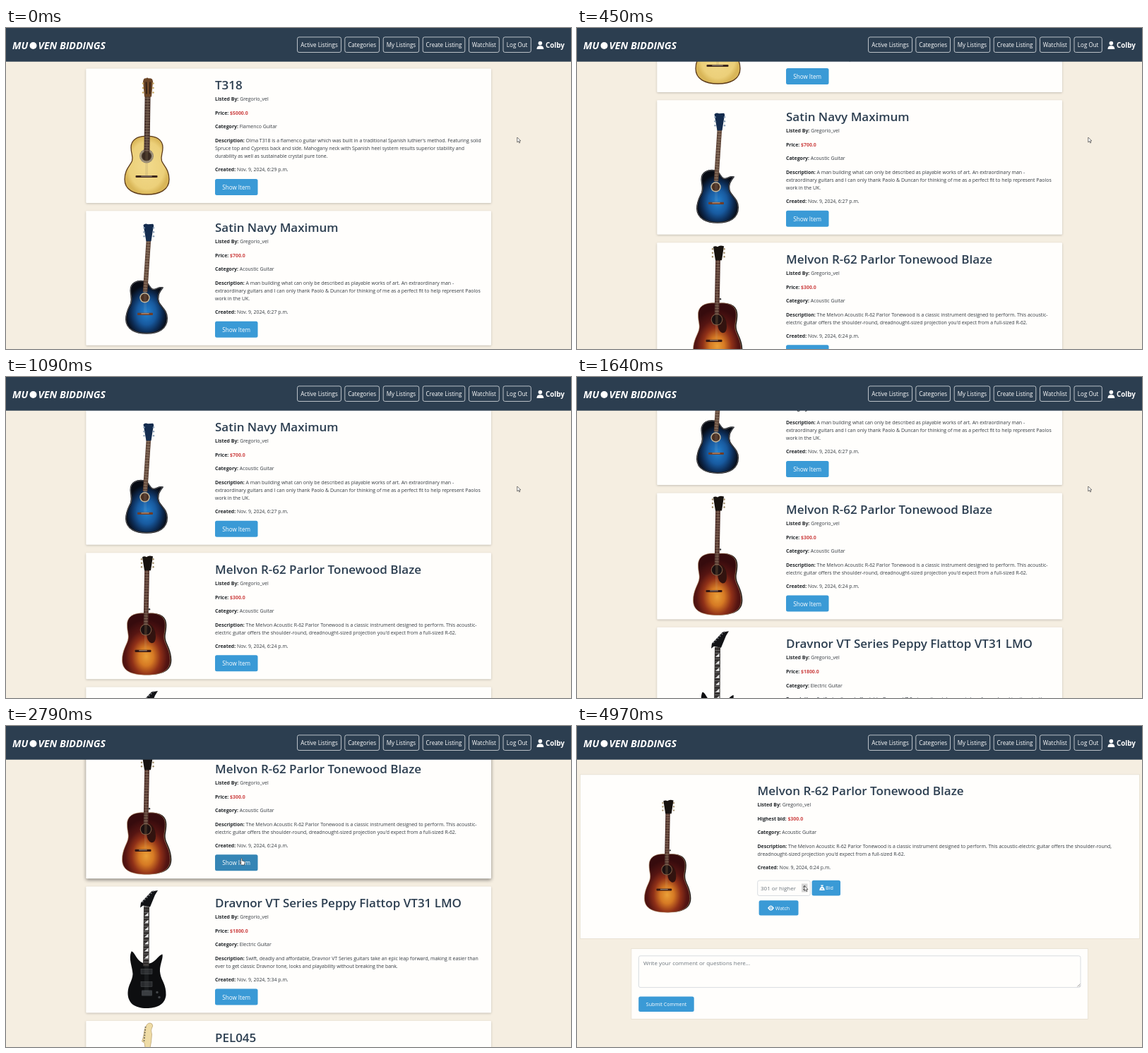
These frames come from a looping animation (800 by 455 pixels, 5000 ms). An HTML page:

```html
<!DOCTYPE html>
<html lang="en">
<head>
<meta charset="utf-8">
<title>Instrument listings</title>
<style>
html, body { margin: 0; width: 100%; height: 100%; overflow: hidden; background: #f5eee1; }
svg { display: block; width: 800px; height: 455px; font-family: 'Open Sans', 'Noto Sans', sans-serif; }
.h { font-size: 17px; font-weight: 600; fill: #2c3e50; }
.p { font-size: 6.93px; fill: #343a40; }
.b { font-weight: 700; fill: #212529; }
.cost { font-weight: 700; fill: #cc4141; }
.nav { font-size: 8.05px; fill: #fff; text-anchor: middle; }
.btn { fill: #fff; text-anchor: middle; }
.user { font-size: 9.8px; font-weight: 700; fill: #fff; }
.brand { font-size: 14.2px; font-weight: 700; font-style: italic; fill: #fff; }
.hint { font-size: 8px; fill: #6c757d; }
.card { fill: #fffefc; filter: drop-shadow(0 1px 1.5px rgba(0,0,0,.2)); }
.panel { fill: #fffefc; stroke: #e6dfd1; stroke-width: .8; }
.field { fill: #fffefc; stroke: #ced4da; stroke-width: .8; }
.blue { fill: #3a9ad6; }
</style>
</head>
<body>
<svg id="stage" viewBox="0 0 800 455" xmlns="http://www.w3.org/2000/svg"></svg>
<script>
const LOOP = 5000, SWITCH = 3000;
const clamp = v => Math.max(0, Math.min(1, v));
const text = (x, y, s, cls, size) =>
  `<text x="${x}" y="${y}" class="${cls}"${size ? ` style="font-size:${size}px"` : ''}>${s}</text>`;
const rect = (x, y, w, h, extra = '', r = 0) =>
  `<rect x="${x}" y="${y}" width="${w}" height="${h}" rx="${r}" ${extra}/>`;
const path = (d, extra) => `<path d="${d}" ${extra}/>`;
const circle = (x, y, r, extra) => `<circle cx="${x}" cy="${y}" r="${r}" ${extra}/>`;
const line = (x1, y1, x2, y2, color, w, dash = '') =>
  path(`M${x1} ${y1}L${x2} ${y2}`, `stroke="${color}" stroke-width="${w}" stroke-dasharray="${dash}" fill="none"`);
const field = (label, value, cls = '') =>
  `<tspan class="b">${label}:</tspan> <tspan class="${cls}">${value}</tspan>`;

// Closed symmetric outline from the cubic points of its right half.
function mirror(cx, half) {
  const right = half.map(([x, y]) => `${cx + x} ${y}`);
  const left = half.slice(0, -1).reverse().map(([x, y]) => `${cx - x} ${y}`);
  return `M${right[0]}C${right.slice(1).join(' ')} ${left.join(' ')}Z`;
}

function neck(x1, y1, x2, y2, w, wood, fret) {
  return line(x1, y1, x2, y2, wood, w) + line(x1, y1, x2, y2, fret, w - 1, '.5 3.4') +
    [-1.2, 0, 1.2].map(o => line(x1 + o, y1, x2 + o, y2, '#b9a68a', .22)).join('');
}

function pegs(xl, xr, y, gap, color, n = 3) {
  let s = '';
  for (let i = 0; i < n; i++)
    s += circle(xl, y + i * gap, 1.2, `fill="${color}"`) + circle(xr, y + i * gap, 1.2, `fill="${color}"`);
  return s;
}

const bridge = (x, y, w, color) =>
  rect(x - w / 2, y - 1.6, w, 3.2, `fill="${color}"`, 1) + line(x - w / 4, y - .4, x + w / 4, y - .4, '#e8dcc0', .7);

function classical() {
  const body = mirror(199.5, [[0, 96], [13, 95], [22.5, 101], [22.5, 112], [22.5, 121], [19, 124], [21, 131],
    [24, 138], [31.5, 143], [31.5, 157], [31.5, 172], [18, 178.5], [0, 178.5]]);
  return path(body, 'fill="url(#spruce)" stroke="#5b3a1a" stroke-width="1.3"') +
    circle(199, 124, 10, 'fill="#8d806a"') + circle(199, 124, 8.6, 'fill="none" stroke="#e8dfc5" stroke-width=".7" stroke-dasharray="1 1"') +
    circle(199, 124, 6.8, 'fill="#3b2b22"') +
    neck(200.6, 38, 199.4, 118, 8, '#47312a', '#a38f78') +
    path('M195 15q2-2 3-1q2-2 4 0q2-1 5 1l1 3-2 22h-10l-2-22z', 'fill="#6b4526"') +
    line(198.5, 19, 199, 36, '#2a1b12', 1.6) + line(204, 19, 203.6, 36, '#2a1b12', 1.6) +
    pegs(194, 208.5, 21, 6.5, '#c5a55e') +
    [-1.2, 0, 1.2].map(o => line(199.2 + o, 118, 199 + o, 152, '#9b8660', .25)).join('') +
    bridge(199, 153, 31, '#3d271d');
}

function cutaway() {
  const body = 'M196 100C186 98 176 102 176.5 113C177 121 179 124 177 131C174 138 170 143 170 154' +
    'C170.5 168 184 173.5 199 173.5C216 173.5 228 167 228 152C228 141 220 137 216.5 130C213.5 122 216 116 221.5 109' +
    'C216 107 212 113 207 111C203 109 202 102 196 100Z';
  return path(body, 'fill="url(#ocean)" stroke="#0a0d16" stroke-width="2"') +
    path(body, 'fill="none" stroke="#d8d4c8" stroke-width=".4"') +
    circle(196.5, 123, 7.2, 'fill="#c5b79a"') + circle(196.5, 123, 5.8, 'fill="#4b3021"') +
    neck(202, 40, 197, 115, 6.5, '#5a4034', '#b49d84') +
    path('M194.5 20Q197 17 201 19L208 18.5Q210 20 208.5 24L205.5 43H198.5Z', 'fill="#142c4e"') +
    pegs(195.5, 209, 24, 6, '#8ba0b5') +
    [-1, 1].map(o => line(197 + o, 115, 197 + o, 145, '#aeb5bd', .25)).join('') +
    bridge(197, 146, 22, '#6f3d28');
}

function sunburst() {
  const half = [[0, 86], [14, 84], [27, 88], [27, 102], [27, 113], [24, 116], [26, 124],
    [28, 131], [34, 139], [34, 152], [34, 168], [20, 173], [0, 173]];
  return path(mirror(200.3, half), 'fill="#17100f"') +
    path(mirror(198.5, half), 'fill="url(#burst)" stroke="#c09a72" stroke-width=".6"') +
    path('M204 101Q212 106 212 119Q212 128 206 128Q200 126 199 116Z', 'fill="#32130f"') +
    circle(198, 109, 8.3, 'fill="#7d5a44"') + circle(198, 109, 7.2, 'fill="#1c1111"') +
    neck(199.6, 23, 198, 102, 6.8, '#4b2d27', '#a78973') +
    path('M193 6Q196 4 199 6Q202 3 208 5L205 25H196Z', 'fill="#17120f"') +
    pegs(192, 208.5, 9, 5.5, '#9f8b67') +
    [-1.2, 0, 1.2].map(o => line(198 + o, 102, 197.5 + o, 138, '#c99b66', .25)).join('') +
    bridge(194, 139, 23, '#361612') + circle(203, 80, 1.2, 'fill="#333"');
}

function electric() {
  const fins = [0, 1, 2, 3, 4, 5, 6].map(i => {
    const y = 37 + i * 10;
    return path(`M196 ${y + 5}L201.5 ${y}V${y + 5}Z`, 'fill="#e9e9e9"');
  }).join('');
  return path('M177.5 92C181 91 184 102 191 107L195 109L203 109C211 108 215 98 221.5 96C223 103 216 113 218.5 124' +
    'C220 133 227 139 226.5 154C225 168 213 172.5 199 172.5C182 172.5 172 165 172.5 150C173 139 179 134 179.5 124' +
    'C179 113 173 103 177.5 92Z', 'fill="#0d0e10"') +
    path('M194 27L190 30L191 23L206 7L215 5.5L211 12L204 29Z', 'fill="#121316"') +
    [0, 1, 2, 3, 4, 5].map(i => circle(193.5 + i * 3, 21.5 - i * 3, 1, 'fill="#85888d"')).join('') +
    path('M195 28H203L202.5 113H194Z', 'fill="#33302f"') +
    line(199, 29, 198.5, 112, '#aaa', 7, '.4 3.5') + fins +
    rect(191, 117, 16, 7, 'fill="#282a2d" stroke="#5d6064" stroke-width=".4"') +
    rect(191, 135, 16, 7, 'fill="#282a2d" stroke="#5d6064" stroke-width=".4"') +
    rect(192, 147, 15, 8, 'fill="#3b3e42"', 1) + circle(214, 150, 1.7, 'fill="#44474a"') + circle(217, 157, 1.7, 'fill="#44474a"') +
    [-2, 0, 2].map(o => line(199 + o, 112, 199 + o, 149, '#77797c', .25)).join('');
}

function mapleHead() {
  return path('M199 6Q202 1.5 206.5 4Q209 7 206.5 10Q204.500 13 206.5 19L205.5 30L204 38H197L196 31L192.500 29Q194 25 195 20Q195.500 11 199 6Z',
    'fill="#efdca6" stroke="#a98d58" stroke-width=".6"') +
    [0, 1, 2, 3, 4, 5].map(i => circle(197.5 - i * .4, 9 + i * 3.8, 1.1, 'fill="#77705c"')).join('') +
    neck(200.5, 37, 200.5, 90, 7, '#e3c27c', '#8d7750');
}

const seller = 'Gregorio_vel';
const burstName = 'Melvon R-62 Parlor Tonewood Blaze';
const burstLead = 'The Melvon Acoustic R-62 Parlor Tonewood is a classic instrument designed to perform. This acoustic-';
const items = [
  { top: 57.5, h: 190.5, art: classical, name: 'T318', cost: '$5000.0', kind: 'Flamenco Guitar', time: '6:29', about: [
    'Olma T318 is a flamenco guitar which was built in a traditional Spanish luthier\'s method. Featuring solid',
    'Spruce top and Cypress back and side. Mahogany neck with Spanish heel system results superior stability and',
    'durability as well as sustainable crystal pure tone.'] },
  { top: 259.3, h: 190.5, art: cutaway, name: 'Satin Navy Maximum', cost: '$700.0', kind: 'Acoustic Guitar', time: '6:27', about: [
    'A man building what can only be described as playable works of art. An extraordinary man -',
    'extraordinary guitars and I can only thank Paolo &amp; Duncan for thinking of me as a perfect fit to help represent Paolos',
    'work in the UK.'] },
  { top: 461.3, h: 179, art: sunburst, name: burstName, cost: '$300.0', kind: 'Acoustic Guitar', time: '6:24', about: [
    burstLead, 'electric guitar offers the shoulder-round, dreadnought-sized projection you\'d expect from a full-sized R-62.'] },
  { top: 651.5, h: 179, art: electric, name: 'Dravnor VT Series Peppy Flattop VT31 LMO', cost: '$1800.0', kind: 'Electric Guitar', time: '5:34', about: [
    'Swift, deadly and affordable, Dravnor VT Series guitars take an epic leap forward, making it easier than',
    'ever to get classic Dravnor tone, looks and playability without breaking the bank.'] },
  { top: 842, h: 179, art: mapleHead, name: 'PEL045' }
];

function details(x, y, item, costLabel) {
  const about = y + 75.2, created = about + item.about.length * 11 + 8.3;
  return text(x, y + 16.5, field('Listed By', seller), 'p') +
    text(x, y + 36, field(costLabel, item.cost, 'cost'), 'p') +
    text(x, y + 55.6, field('Category', item.kind), 'p') +
    item.about.map((s, i) => text(x, about + i * 11, i ? s : field('Description', s), 'p')).join('') +
    text(x, created, field('Created', `Nov. 9, 2024, ${item.time} p.m.`), 'p');
}

function listing(item, i) {
  let s = rect(113.3, 0, 573.7, item.h, `class="card" id="card${i}"`, 1) + item.art() + text(296, 29.5, item.name, 'h');
  if (item.about) {
    const y = item.h - 34;
    s += details(296, 29.3, item, 'Price') +
      rect(296, y, 60.5, 23, `class="blue" id="show${i}"`, 2.5) + text(326.2, y + 15.2, 'Show Item', 'btn', 8.1);
  }
  return `<g transform="translate(0 ${item.top})">${s}</g>`;
}

function detailPage() {
  const item = { ...items[2], about: [burstLead + 'electric guitar offers the shoulder-round,',
    'dreadnought-sized projection you\'d expect from a full-sized R-62.'] };
  return rect(4.4, 68.8, 792.2, 232.7, 'class="panel"') +
    `<g transform="translate(-60 100.7) scale(.945)">${sunburst()}</g>` +
    text(255.5, 98, item.name, 'h') + details(255.5, 97.8, item, 'Highest bid') +
    rect(255.7, 219, 74.5, 21.5, 'class="field"', 2.5) + text(260, 233, '301 or higher', 'hint') +
    `<g id="spin">${rect(318, 223.5, 8.5, 12, 'fill="#d5d5d5"')}${path('M320 228.5l2.2-2.5 2.2 2.5zM320 231l2.2 2.5 2.2-2.5z', 'fill="#444"')}</g>` +
    rect(332.6, 218.8, 40.4, 21.8, 'class="blue"', 2.5) + text(357.5, 232.4, 'Bid', 'btn', 7.2) +
    path('M345 225.5h4l-1 2h-2zM345.5 228h3q2.5 2 2.3 5h-7.6q-.2-3 2.3-5z', 'fill="#fff"') +
    circle(347, 230.8, .9, 'class="blue"') +
    rect(257.6, 247.2, 55.9, 21.4, 'class="blue"', 2.5) + text(291, 260.6, 'Watch', 'btn', 7) +
    path('M270 258Q274.5 250.8 279 258Q274.5 265.2 270 258Z', 'fill="#fff"') +
    circle(274.5, 258, 2.1, 'class="blue"') + circle(274.5, 258, 1.1, 'fill="#fff"') +
    rect(76.9, 315.6, 646.6, 99.9, 'class="panel"') +
    rect(87.4, 325.8, 625.6, 44.8, 'class="field"', 2.5) + text(94, 339, 'Write your comment or questions here...', 'hint') +
    path('M708.5 369.5l4-4M710.8 369.5l1.7-1.7', 'stroke="#666" stroke-width=".6"') +
    rect(87.2, 383.5, 78.5, 21.5, 'class="blue"', 2.5) + text(126.5, 397, 'Submit Comment', 'btn', 7);
}

function header() {
  const links = [['Active Listings', 412.5, 62], ['Categories', 479.8, 48.7], ['My Listings', 534.2, 50.5],
    ['Create Listing', 590.2, 59.6], ['Watchlist', 655.5, 42.8], ['Log Out', 704, 39.3]];
  return rect(0, 0, 800, 47.7, 'fill="#2c3e50"') +
    text(9, 30, 'MU', 'brand') + circle(38.5, 25, 5, 'fill="#fff"') + text(45.5, 30, 'VEN BIDDINGS', 'brand') +
    links.map(([s, x, w]) => rect(x, 12.9, w, 21.6, 'fill="none" stroke="#dfe3e6" stroke-width=".8"', 2.5) +
      text(x + w / 2, 27, s, 'nav')).join('') +
    circle(756.4, 21.6, 2.8, 'fill="#fff"') + path('M751.5 30q0-4.7 4-4.7h1.8q4 0 4 4.7z', 'fill="#fff"') +
    text(764, 28, 'Colby', 'user');
}

const stops = (...list) => list.map(([o, c]) => `<stop offset="${o}" stop-color="${c}"/>`).join('');
const stage = document.getElementById('stage');
stage.innerHTML = `<defs>
  <radialGradient id="spruce">${stops([0, '#f2da8c'], [.8, '#ecd07a'], [1, '#d9b658'])}</radialGradient>
  <radialGradient id="ocean" cy=".6" r=".52">${stops([0, '#2482d0'], [.45, '#185a9f'], [.75, '#0c2a52'], [1, '#070b14'])}</radialGradient>
  <radialGradient id="burst" cy=".7" r=".6">${stops([0, '#eaa038'], [.25, '#d67a24'], [.5, '#8f3018'], [.72, '#561512'], [1, '#360b0d'])}</radialGradient>
</defs>
${rect(0, 0, 800, 455, 'fill="#f5eee1"')}
<g id="list">${items.map(listing).join('')}</g>
<g id="detail">${detailPage()}</g>
${header()}
<g id="pointer">
  ${path('M0 0V7L1.7 5.5L2.9 8L4 7.5L2.9 5H5Z', 'id="arrow" fill="#fff" stroke="#222" stroke-width=".6"')}
  ${path('M-1.3 4V-3q.8-1.2 1.6 0V0l3 .8q1.2.4 1 2L3.5 6H-.5L-3 2.2q0-1 1-.4z', 'id="hand" fill="#fff" stroke="#222" stroke-width=".6"')}
  ${path('M-1.5-4H1.5M0-4V4M-1.5 4H1.5', 'id="beam" fill="none" stroke="#222" stroke-width=".8"')}
</g>`;

const $ = id => document.getElementById(id);
const show = (id, on) => $(id).setAttribute('visibility', on ? 'visible' : 'hidden');

const ticks = [30, 140, 250, 360, 560, 1150, 1350, 1680, 1790, 1890];
const scroll = t => 42.4 * ticks.reduce((sum, s) => {
  const k = clamp((t - s) / 200);
  return sum + k * (2 - k);
}, 0);

// Pointer stops: time, x, y; it rests where two neighbours share a place.
const track = [[2210, 723.8, 155], [2730, 334, 191], [3400, 334, 191], [3800, 304.5, 202], [4200, 304.5, 202], [4850, 322, 226.5]];
function pointer(t) {
  if (t <= track[0][0]) return track[0].slice(1);
  for (let i = 1; i < track.length; i++) {
    const [t0, x0, y0] = track[i - 1], [t1, x1, y1] = track[i];
    if (t < t1) {
      const k = (t - t0) / (t1 - t0), e = k * k * (3 - 2 * k);
      return [x0 + (x1 - x0) * e, y0 + (y1 - y0) * e];
    }
  }
  return track[track.length - 1].slice(1);
}

const start = performance.now();
function frame() {
  const t = (performance.now() - start) % LOOP;
  const onList = t < SWITCH, [x, y] = pointer(t);
  show('list', onList);
  show('detail', !onList);
  $('list').setAttribute('transform', `translate(0 ${-scroll(t).toFixed(2)})`);

  const lift = clamp((t - 2310) / 200);
  $('card2').style.filter = `drop-shadow(0 ${1 + lift}px ${1.5 + lift}px rgba(0,0,0,${.2 + .25 * lift}))`;
  const onButton = onList && x > 296 && x < 356.5 && y > 182;
  $('show2').style.fill = onButton ? '#3585b5' : '';

  const inField = !onList && y > 219;
  const onText = !onList && x < 318 && y > 196;
  show('spin', inField);
  show('hand', onButton);
  show('beam', onText);
  show('arrow', !onButton && !onText);
  $('pointer').setAttribute('transform', `translate(${x.toFixed(2)} ${y.toFixed(2)})`);
  requestAnimationFrame(frame);
}
frame();
</script>
</body>
</html>
```
